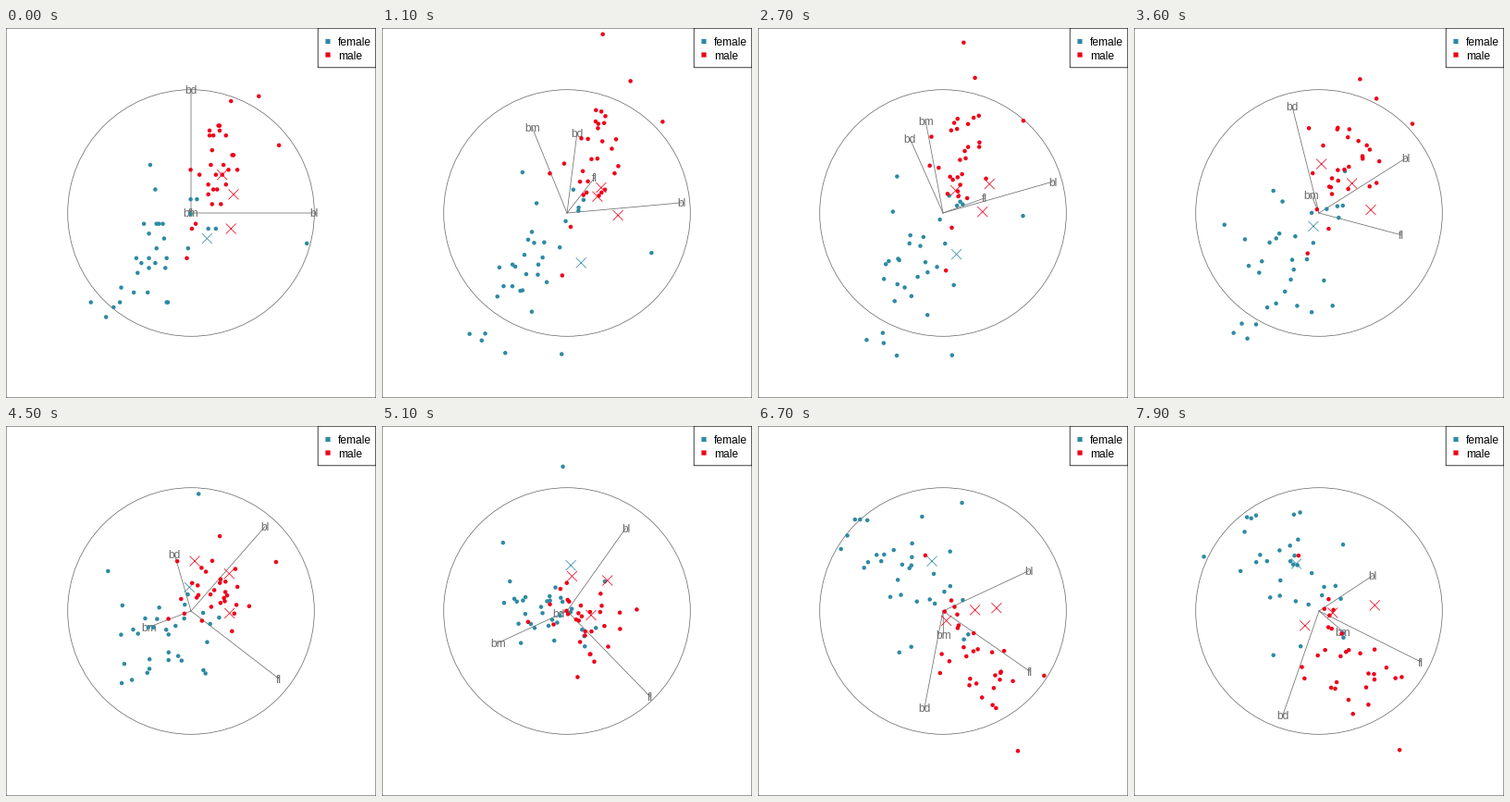
Recreate the animation shown at these times as a matplotlib script. Size 400 px wide and 400 px high, loop 8 s.

```python
import numpy as np
import matplotlib.pyplot as plt
from matplotlib.animation import FuncAnimation
from matplotlib.patches import Circle, Rectangle

SIZE, MID, RADIUS = 400, 200, 133.3
PX = 0.72  # points per pixel at 100 dpi
THIN = 0.75 * PX
TEAL, RED, GREY = "#2e8aa4", "#ee0019", "#6c6c6c"
NAMES = ["bl", "bd", "fl", "bm"]

# Centre and full range of bl, bd, fl, bm; one range spans SPAN pixels.
CENTRE = np.array([48.83, 18.42, 195.8, 3733])
RANGE = np.array([17.1, 4.4, 34, 2100])
STEP = np.array([0.1, 0.1, 1, 25])
SPAN = 233.4

# Birds that stand apart from their group, then those marked with a cross.
FEMALE_EDGE = [(58.0, 17.8, 181, 3700), (40.9, 16.6, 187, 3200),
               (46.9, 16.6, 192, 2700), (43.2, 16.6, 187, 2900),
               (45.6, 19.4, 194, 3525), (46.1, 18.2, 178, 3250),
               (46.0, 18.9, 195, 4150)]
FEMALE_CROSS = [(50.1, 17.9, 190, 3400)]
MALE_EDGE = [(52.0, 20.7, 210, 4800), (54.2, 20.8, 201, 4300),
             (55.8, 19.8, 207, 4000), (48.5, 17.5, 191, 3400),
             (49.2, 18.2, 195, 4400), (50.3, 20.0, 197, 3300)]
MALE_CROSS = [(51.3, 19.2, 193, 3650), (52.2, 18.8, 197, 3450),
              (52.0, 18.1, 201, 4050)]

rng = np.random.default_rng(4)


def flock(count, mean, spread, shared=0.45):
    """Random birds whose four measures partly follow one body size."""
    size = rng.standard_normal((count, 1))
    own = rng.standard_normal((count, 4))
    z = np.sqrt(shared) * size + np.sqrt(1 - shared) * own
    values = np.array(mean) + np.clip(z, -1.9, 1.9) * spread
    return np.round(values / STEP) * STEP


def scaled(rows):
    return (np.array(rows) - CENTRE) / RANGE * SPAN


def basis(*tips):
    """Nearest orthonormal 4x2 basis to the given axis tips (pixels, y up)."""
    u, _, vt = np.linalg.svd(np.array(tips) / RADIUS, full_matrices=False)
    return u @ vt


def geodesic(a, b, t):
    """Plane rotation that is a at t=0 and b at t=1; t may run past 1."""
    u, c, vt = np.linalg.svd(a.T @ b)
    c = np.clip(c, -1, 1)
    angle = np.arccos(c)
    start, end = a @ u, b @ vt.T
    side = (end - start * c) / np.maximum(np.sin(angle), 1e-9)
    plane = (start * np.cos(angle * t) + side * np.sin(angle * t)) @ u.T
    turn = u @ vt
    phi = np.arctan2(turn[1, 0], turn[0, 0]) * t
    spin = np.array([[np.cos(phi), -np.sin(phi)], [np.sin(phi), np.cos(phi)]])
    return plane @ spin


def build_tour():
    """Legs of the tour as (first step, last step, from basis, to basis)."""
    early = basis((123, 10.5), (10.5, 86.5), (30, 38.5), (-38, 92.5))
    rising = basis((118.5, 33.5), (-36, 80.5), (45, 16), (-19, 99.5))
    middle = basis((79.5, 90.5), (-18, 61.5), (95, -73), (-45, -17))
    falling = basis((61.5, 71), (-7, -58.5), (89, -88.5), (-78, -39.5))
    late = basis((92.5, 44), (-20.5, -105.5), (93, -65), (0.5, -25.5))
    last = basis((58, 38.5), (-39, -113.5), (110, -55.5), (26, -22.5))

    # Stops between legs follow by extending the legs through known poses.
    b0 = np.eye(4)[:, :2]
    b1 = geodesic(b0, early, 13 / 11)
    b4 = geodesic(late, falling, 11 / 9)
    b5 = geodesic(falling, late, 15 / 9)
    b3 = geodesic(b4, middle, 17 / 10)
    b2 = geodesic(b3, rising, 15 / 10)
    return [(0, 13, b0, b1), (14, 21, b1, b2), (22, 37, b2, b3),
            (38, 55, b3, b4), (56, 73, b4, b5), (74, 79, b5, last)]


TOUR = build_tour()


def pose(i):
    first, end, a, b = [leg for leg in TOUR if leg[0] <= i][-1]
    return geodesic(a, b, (i - first) / (end - first))


def to_stage(xy):
    return MID + xy * [1, -1]


fig = plt.figure(figsize=(4, 4), dpi=100, facecolor="white")
ax = fig.add_axes([0, 0, 1, 1])
ax.set_xlim(0, SIZE)
ax.set_ylim(SIZE, 0)
ax.axis("off")

FONT = dict(family="Liberation Sans", fontsize=12 * PX, va="baseline")


def box(x, y, w, h, **style):
    ax.add_patch(Rectangle((x, y), w, h, snap=False, **style))


def marks(rows, color, marker="o", width=4.5, line=0):
    dots = ax.scatter([], [], marker=marker, s=(width * PX) ** 2,
                      linewidths=line, zorder=3, snap=False)
    # A list of colours keeps the markers from snapping to whole pixels.
    dots.set_color([color, color])
    return scaled(rows), dots


def crosses(rows, color):
    return marks(rows, color, marker="x", width=11, line=THIN)


ax.add_patch(Circle((MID, MID), RADIUS, fill=False, ec=GREY, lw=THIN, zorder=1))
spokes = [ax.plot([], [], color=GREY, lw=THIN, snap=False, zorder=1)[0]
          for _ in NAMES]
tags = [ax.text(MID, MID, n, color=GREY, ha="center", zorder=2, **FONT)
        for n in NAMES]

females = flock(26, (46.4, 17.5, 192.6, 3580), (2.3, 0.65, 4.6, 200))
males = flock(25, (50.9, 19.2, 200, 3920), (1.15, 0.6, 5.5, 270))
groups = [
    marks(np.vstack([females, FEMALE_EDGE]), TEAL),
    crosses(FEMALE_CROSS, TEAL),
    marks(np.vstack([males, MALE_EDGE]), RED),
    crosses(MALE_CROSS, RED),
]

# Legend and border
box(337.2, 0, 62.8, 42.8, fc="white", ec="black", lw=THIN, zorder=4)
for y, name, color in [(14.5, "female", TEAL), (29, "male", RED)]:
    box(345.4, y - 2.6, 5.2, 5.2, fc=color, lw=0, zorder=5)
    ax.text(358.9, y + 4.7, name, color="black", zorder=5, **FONT)
box(0, 0, SIZE, SIZE, fill=False, ec="black", lw=THIN, zorder=6)


def draw(i):
    frame = pose(i)
    for points, dots in groups:
        dots.set_offsets(to_stage(points @ frame))
    for (x, y), spoke, tag in zip(to_stage(frame * RADIUS), spokes, tags):
        spoke.set_data([MID, x], [MID, y])
        tag.set_position((x, y + 4.5))
    return []


anim = FuncAnimation(fig, draw, frames=80, interval=100, repeat=True,
                     repeat_delay=0, blit=False)
plt.show()
```
